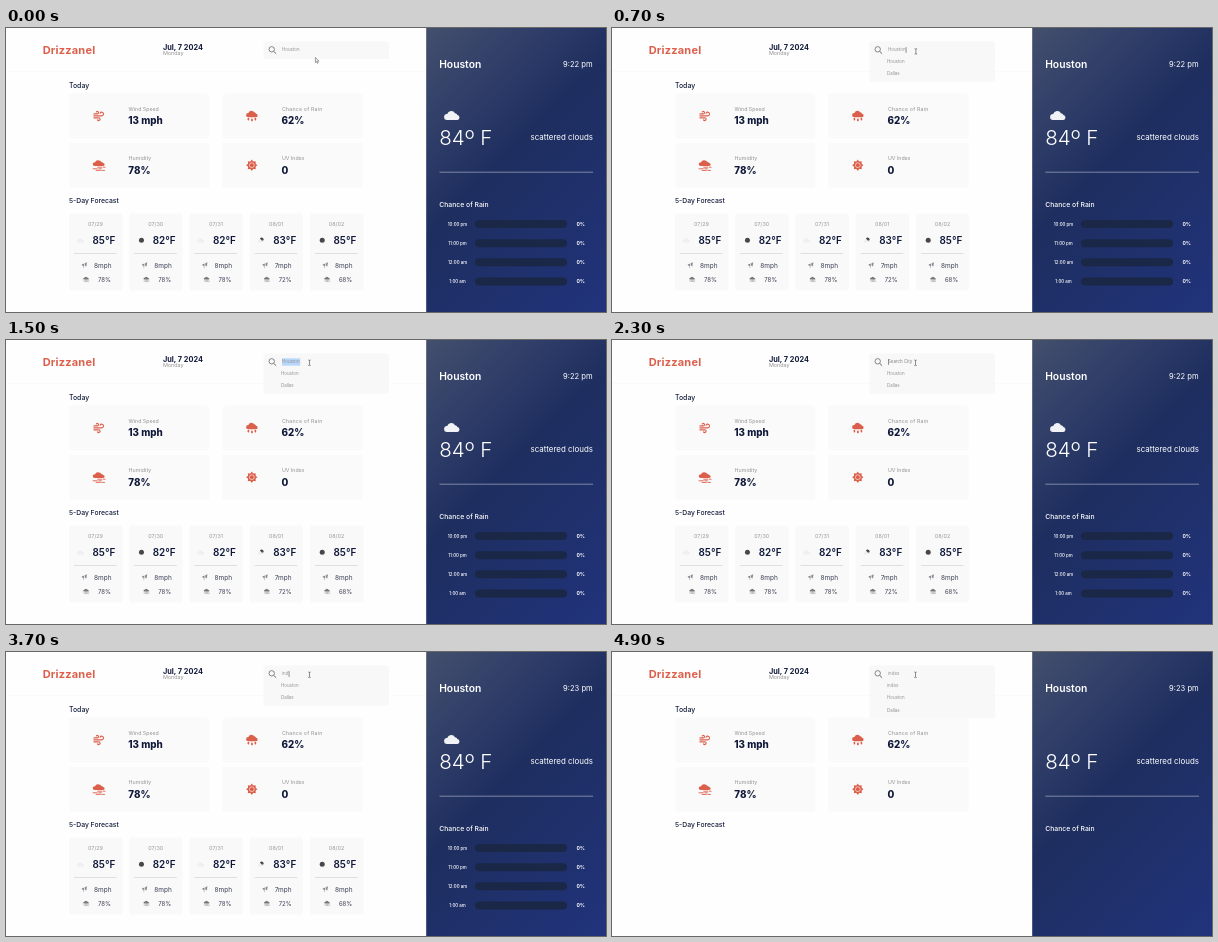
An HTML page for the animation above (5 s loop, 600 by 284 pixels).

```html
<!DOCTYPE html>
<html lang="en">
<head>
<meta charset="utf-8">
<title>Weather dashboard</title>
<style>
html, body { margin: 0; width: 100%; height: 100%; overflow: hidden; background: #fefefe; }
svg { display: block; width: 100%; height: 100%; font-family: Inter, "Open Sans", sans-serif; }
text { white-space: pre; }
</style>
</head>
<body>
<svg id="stage" viewBox="0 0 600 284" xmlns="http://www.w3.org/2000/svg">
  <defs>
    <linearGradient id="night" gradientUnits="userSpaceOnUse" x1="394" y1="26" x2="626" y2="258">
      <stop offset="0" stop-color="#434f6b"/>
      <stop offset=".2" stop-color="#33416a"/>
      <stop offset=".45" stop-color="#1e2e5f"/>
      <stop offset="1" stop-color="#21337c"/>
    </linearGradient>
    <path id="cloud" d="M3 10a3 3 0 0 1 .2-6A4.2 4.2 0 0 1 11 3.2a3 3 0 0 1 2.4 1.9A2.5 2.5 0 0 1 13.5 10z"/>
    <g id="wind" fill="none" stroke-width="1.15" stroke-linecap="round">
      <path d="M.6 5.8H8.4a1.8 1.8 0 1 0-1.6-2.6M.6 3.8H4a1.2 1.2 0 1 0-1-1.8M.6 7.8H5.4a1.4 1.4 0 1 1-1.2 2.1"/>
    </g>
    <g id="rain">
      <use href="#cloud" transform="scale(.75 .72)"/>
      <path d="M2.4 8.7v.9M5.9 9.4v1M9.4 8.7v.9" stroke-width="1.7" stroke-linecap="round"/>
    </g>
    <g id="haze">
      <use href="#cloud" transform="translate(.3 0) scale(.78 .65)"/>
      <path d="M5 7.6H13.2M.4 9.2H9.5M3.4 10.8H12.6" stroke-width=".9" stroke-dasharray="5 .7"/>
    </g>
    <g id="vane">
      <path d="M.2 2.2 2.8 1.2 2.6 3.8 1 3.6zM3.4 1 5.6 0 4.9 4.2 3.4 3.2zM1.6 4.2 2.8 4.4 2.3 6z"/>
    </g>
  </defs>
  <g id="base"></g>
  <g id="week"></g>
  <g id="rainRows"></g>
  <g id="search"></g>
  <g id="pointer"></g>
</svg>
<script>
const LOOP = 5000, STEP = 100;
const NAVY = '#10193a', GRAY = '#929296', RED = '#dc5f4b';
const $ = id => document.getElementById(id);

const text = (x, y, str, size, fill, weight = 400, anchor = 'start', space = 0) =>
  `<text x="${x}" y="${y}" font-size="${size}" fill="${fill}" font-weight="${weight}" text-anchor="${anchor}" letter-spacing="${space}">${str}</text>`;
const rect = (x, y, w, h, fill, r = 0) =>
  `<rect x="${x}" y="${y}" width="${w}" height="${h}" rx="${r}" fill="${fill}"/>`;
const line = (x1, x2, y, color, width = .6) =>
  `<path d="M${x1} ${y}H${x2}" stroke="${color}" stroke-width="${width}"/>`;
const icon = (id, x, y, color, scale = 1) =>
  `<use href="#${id}" transform="translate(${x} ${y}) scale(${scale})" fill="${color}" stroke="${color}" stroke-width="0"/>`;

function sun(cx, cy) {
  let teeth = '';
  for (let i = 0; i < 8; i++)
    teeth += `<path d="M-1.6-3.4 0-5.7 1.6-3.4z" transform="rotate(${i * 45})"/>`;
  return `<g transform="translate(${cx} ${cy})" fill="${RED}">${teeth}<circle r="4"/>
    <circle r="2.4" fill="none" stroke="#fafafa" stroke-width=".6"/></g>`;
}

function stat(x, y, label, value, space) {
  return rect(x, y, 140.5, 45, '#fafafa', 3)
    + text(x + 59.6, y + 17, label, 5.25, GRAY, 400, 'start', space)
    + text(x + 59.3, y + 30.7, value, 9.8, NAVY, 800);
}

function buildBase() {
  $('base').innerHTML =
    rect(0, 0, 600, 284, '#fefefe')
    + line(0, 420, 43.5, '#fafafa', 1)
    + text(36.7, 25.6, 'Drizzanel', 11, RED, 700, 'start', .2)
    + text(157, 22.2, 'Jul, 7 2024', 7.35, NAVY, 700)
    + text(157, 27.3, 'Monday', 5.4, GRAY)
    + text(63, 60.2, 'Today', 6.9, NAVY, 500)
    + stat(63, 65.5, 'Wind Speed', '13 mph', 0)
    + stat(216.3, 65.5, 'Chance of Rain', '62%', .2)
    + stat(63, 114.8, 'Humidity', '78%', .08)
    + stat(216.3, 114.8, 'UV Index', '0', 0)
    + icon('wind', 87.3, 82, RED) + icon('rain', 240, 82, RED)
    + icon('haze', 86.3, 131.6, RED) + sun(245.8, 137.2)
    + text(63, 175, '5-Day Forecast', 6.8, NAVY, 500)
    + rect(420.2, 0, 180, 284, 'url(#night)')
    + text(433.2, 39.6, 'Houston', 10.3, '#fff', 600)
    + '<g id="clock"></g>'
    + text(433.2, 116.6, '84º F', 20.6, '#fff', 350)
    + text(587, 111.7, 'scattered clouds', 7.95, '#fff', 400, 'end')
    + line(433.5, 587, 144.2, '#a4abc2', .7)
    + text(433.3, 179.3, 'Chance of Rain', 6.8, '#fff', 500);
}

function sky(kind, x) {
  if (kind === 'cloud') return icon('cloud', x - 3.5, 209.8, '#efefef', .48);
  if (kind === 'dot') return `<circle cx="${x + 1.2}" cy="212.2" r="2.5" fill="#48484a"/>`;
  return icon('cloud', x - 3, 210.3, '#efefef', .4)
    + `<path d="M${x - .8} 210.6a1.8 1.8 0 0 1 3.4 1.7l-1.3.5z" fill="#48484a"/>`;
}

function buildWeek() {
  const days = [
    ['07/29', 85, 8, 78, 'cloud'], ['07/30', 82, 8, 78, 'dot'], ['07/31', 82, 8, 78, 'cloud'],
    ['08/01', 83, 7, 72, 'part'], ['08/02', 85, 8, 68, 'dot']
  ];
  $('week').innerHTML = days.map(([date, temp, wind, damp, kind], i) => {
    const x = 63 + i * 60.25;
    return rect(x, 185.5, 53.3, 77, '#f9f9f9', 3)
      + text(x + 26.5, 198, date, 5.4, '#98989c', 400, 'middle')
      + sky(kind, x + 11)
      + text(x + 23.5, 215.9, temp + '°F', 9.95, NAVY, 600)
      + line(x + 5, x + 47.5, 225.5, '#cfcfd2')
      + icon('vane', x + 12.4, 234.2, '#8c8c90')
      + text(x + 25, 239.6, wind + 'mph', 6.5, '#3d4256')
      + icon('haze', x + 14.1, 248.6, '#77777b', .46)
      + text(x + 28.9, 253.6, damp + '%', 6, '#3d4256');
  }).join('') + icon('cloud', 438, 82, '#f1f2f5');
}

function buildRain() {
  $('rainRows').innerHTML = ['10:00 pm', '11:00 pm', '12:00 am', '1:00 am'].map((hour, i) => {
    const y = 196 + i * 19.15;
    return text(451.5, y + 1.5, hour, 4.4, '#fff', 500, 'middle')
      + rect(469, y - 4, 92, 8, '#1a2747', 4)
      + text(579, y + 2, '0%', 5.1, '#fff', 700, 'end');
  }).join('');
}

// [start, value, caret x or 0]
const typing = [
  [0, 'Houston', 0], [700, 'Houston', 294], [1200, 'Houston', 0], [1500, 'Houston', 0],
  [2300, '', 276.4], [2800, '', 0], [3300, '', 276.4], [3500, 'in', 280.1],
  [3700, 'ind', 283], [3800, 'inde', 285.6], [4200, 'index', 288.2], [4700, 'index', 0]
];

function drawSearch(t) {
  const [, value, caret] = typing.filter(s => s[0] <= t).pop();
  const cities = t < 700 ? [] : t < 4900 ? ['Houston', 'Dallas'] : ['index', 'Houston', 'Dallas'];
  const bottom = cities.length ? 28.8 + cities.length * 12.3 : 31;
  const selected = t >= 1500 && t < 2300;
  $('search').innerHTML =
    rect(257.5, 13.5, 125.5, bottom - 13.5, '#f8f8f8', 1.5)
    + '<path d="M267.7 23.4l2.4 2.3" stroke="#6a6a6e" stroke-width="1"/>'
    + '<circle cx="265.7" cy="21.3" r="2.7" fill="none" stroke="#6a6a6e" stroke-width=".8"/>'
    + (selected ? rect(276, 18.3, 18.2, 7.4, '#b9d7fb') : '')
    + text(276, 23.4, value || 'Search City', 4.45, value ? GRAY : '#7f7f84')
    + (caret ? rect(caret - .25, 19, .6, 6, '#5a5a5e') : '')
    + cities.map((c, i) => text(275, 34.8 + i * 12.4, c, 4.45, GRAY)).join('');
}

function drawPointer(t) {
  const mix = (a, b, p) => a + (b - a) * p;
  const ease = p => 1 - (1 - p) ** 2;
  const a = ease(Math.min(t / 300, 1));
  const b = ease(Math.min(Math.max((t - 300) / 700, 0), 1));
  const x = mix(mix(309.4, 305.5, a), 303.5, b);
  const y = mix(mix(29.5, 24, a), t < 1300 ? 23.3 : 22.8, b);
  $('pointer').innerHTML = t < 200
    ? `<path d="M${x} ${y}v5l1.1-1 .8 1.8.9-.4-.8-1.8h1.5z" fill="#f4f4f4" stroke="#77777b" stroke-width=".7"/>`
    : `<path d="M${x - 1.2} ${y - 2.8}q1.2 0 1.2.8 0-.8 1.2-.8M${x} ${y - 2.2}v4.4M${x - 1.2} ${y + 2.8}q1.2 0 1.2-.8 0 .8 1.2.8" fill="none" stroke="#55555a" stroke-width=".65"/>`;
}

function draw(t) {
  $('clock').innerHTML = text(586.7, 38.8, t < 3100 ? '9:22 pm' : '9:23 pm', 7.6, '#fff', 400, 'end');
  const loaded = t < 4900 ? 'visible' : 'hidden';
  $('week').setAttribute('visibility', loaded);
  $('rainRows').setAttribute('visibility', loaded);
  drawSearch(t);
  drawPointer(t);
}

buildBase();
buildWeek();
buildRain();

const start = performance.now();
let last = -1;
function tick() {
  const t = Math.floor((performance.now() - start) % LOOP / STEP) * STEP;
  if (t !== last) draw(last = t);
  requestAnimationFrame(tick);
}
tick();
</script>
</body>
</html>
```
